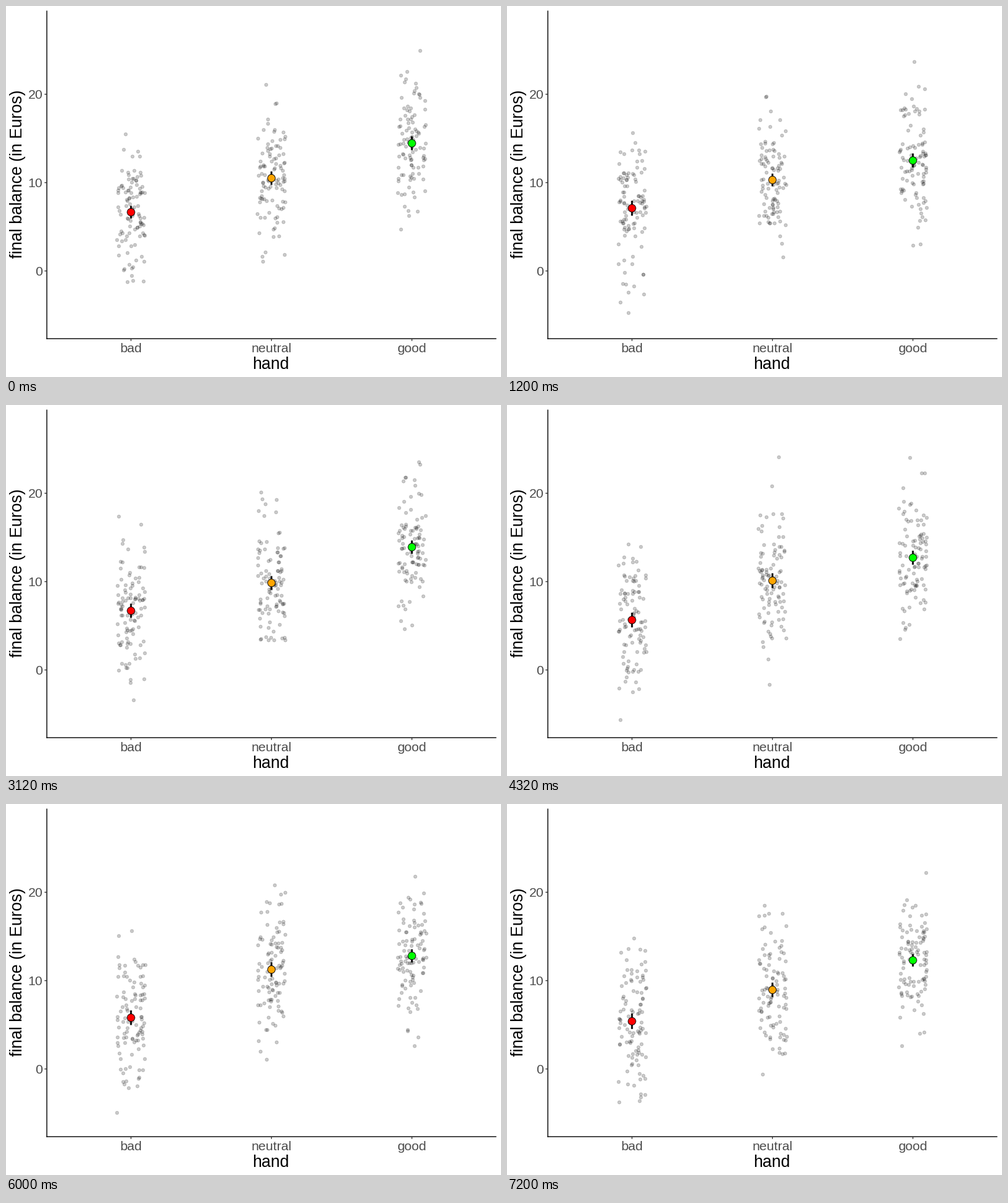
These frames come from a looping animation (800 px wide and 600 px high, 8000 ms). A matplotlib script:

```python
import matplotlib.pyplot as plt
import numpy as np
from matplotlib.animation import FuncAnimation

PX = 0.72  # points per pixel at 100 dpi
plt.rcParams["font.family"] = "Liberation Sans"

HANDS = ("bad", "neutral", "good")
COLORS = ("#ff0000", "#ffa500", "#00ff00")
CENTERS = [202 + 227 * i for i in range(3)]
LEFT, RIGHT, TOP, BOTTOM = 66, 792.5, 7.5, 538

# Mean final balance of each hand, one row per simulated sample.
MEANS = (
    (6.65, 10.5, 14.45),
    (7.1, 10.3, 12.5),
    (6.7, 9.85, 13.9),
    (5.65, 10.1, 12.7),
    (5.7, 10.45, 11.9),
    (5.8, 11.25, 12.8),
    (5.4, 8.95, 12.3),
)
N, SD, JITTER = 100, 4, 22.7


def to_y(euros):
    return 428.5 - 14.29 * euros


def draw_sample(rng, mean):
    """Normal values moved so that their mean is exact."""
    values = rng.normal(0, SD, N)
    return values - values.mean() + mean


rng = np.random.default_rng(12)
samples = [[draw_sample(rng, mean) for mean in row] for row in MEANS]
jitter = rng.uniform(-JITTER, JITTER, (len(MEANS), len(HANDS), N))

fig = plt.figure(figsize=(8, 6), dpi=100, facecolor="white")
ax = fig.add_axes([0, 0, 1, 1])
ax.set_xlim(0, 800)
ax.set_ylim(600, 0)
ax.axis("off")


def line(xs, ys, color="black", width=1.42, z=1):
    return ax.plot(xs, ys, color=color, lw=width * PX, solid_capstyle="butt",
                   snap=False, zorder=z)[0]


def label(x, y, text, size=26.67, color="black", ha="center", **kw):
    ax.text(x, y, text, fontsize=size * PX, color=color, ha=ha,
            va="baseline", **kw)


def tick_label(x, y, text, ha="center"):
    label(x, y, text, 21.33, "#4d4d4d", ha)


def circles(diameter, z, **kw):
    return ax.scatter([0] * 3, [0] * 3, s=(diameter * PX) ** 2,
                      linewidth=0.945 * PX, zorder=z, **kw)


line([LEFT, LEFT], [TOP, BOTTOM + 0.7])
line([LEFT - 0.7, RIGHT], [BOTTOM, BOTTOM])
for value in (0, 10, 20):
    y = to_y(value)
    line([LEFT - 3.7, LEFT], [y, y], "#333333")
    tick_label(59.4, y + 7.5, str(value), "right")
for x, hand in zip(CENTERS, HANDS):
    line([x, x], [BOTTOM, BOTTOM + 3.7], "#333333")
    tick_label(x, 560, hand)
label(428.3, 587, "hand")
label(26, 271.5, "final balance (in Euros)", rotation=90,
      rotation_mode="anchor")

faint = (0, 0, 0, 0.2)
dots = circles(5.2, 2, facecolor=faint, edgecolor=faint)
bars = [line([x, x], [0, 0], width=2.85, z=3) for x in CENTERS]
means = circles(12.3, 4, c=COLORS, edgecolor="black")


def update(frame):
    k = frame // 3  # each sample stays for 1200 ms
    xs = np.array(CENTERS)[:, None] + jitter[k]
    ys = to_y(np.array(samples[k]))
    dots.set_offsets(np.column_stack([xs.ravel(), ys.ravel()]))
    mid = ys.mean(axis=1)
    half = 1.96 * ys.std(axis=1, ddof=1) / np.sqrt(N)
    means.set_offsets(np.column_stack([CENTERS, mid]))
    for bar, m, h in zip(bars, mid, half):
        bar.set_ydata([m - h, m + h])
    return [dots, means, *bars]


anim = FuncAnimation(fig, update, frames=20, interval=400, repeat=True,
                     repeat_delay=0, blit=False)
plt.show()
```
